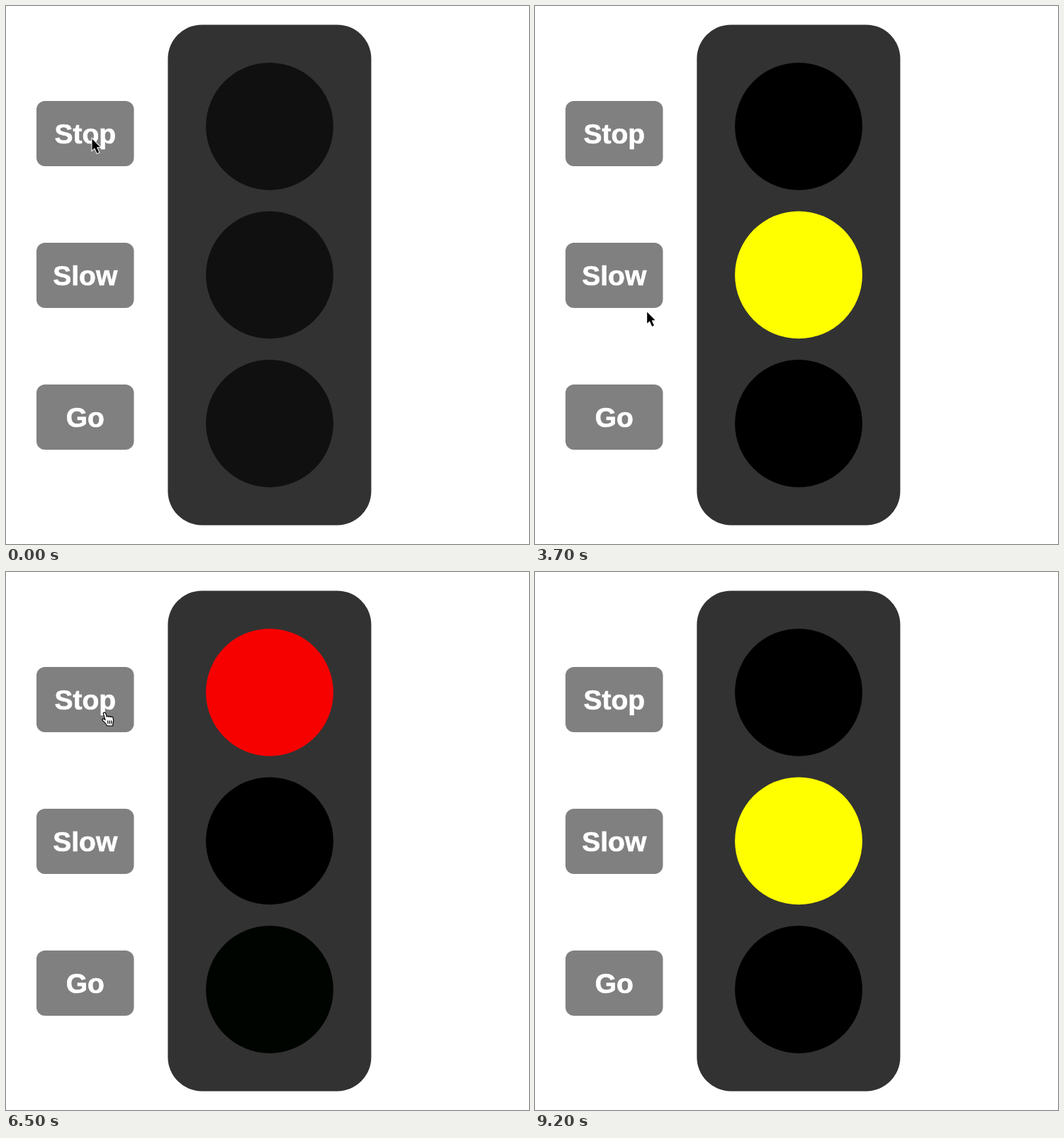
Recreate the animation shown at these times as an HTML page. Size 738 by 759 pixels, loop 9300 ms.

```html
<!DOCTYPE html>
<html lang="en">
<head>
<meta charset="utf-8">
<title>Traffic light</title>
<style>
  html, body { margin: 0; width: 100%; height: 100%; overflow: hidden; background: #fff; }
  svg { display: block; }
  text {
    font: bold 39px "Liberation Sans", Arial, sans-serif;
    fill: #fff; stroke: #fff; stroke-width: .7; text-anchor: middle;
  }
</style>
</head>
<body>
<svg width="738" height="759" viewBox="0 0 738 759">
  <rect x="228.4" y="26.4" width="287" height="706" rx="48" fill="#323232"/>
  <g id="lights"></g>
  <g id="buttons"></g>
  <g id="ring" fill="none">
    <circle r="36.2" stroke="#fff" stroke-width="3.4"/>
    <circle r="36.2" stroke="#000" stroke-width="1.5"/>
  </g>
  <path id="arrow" d="M0 0V16L3.6 12.8L7 20.2L9.8 19L6.5 11.8L11.3 11.4Z"
    stroke="#fff" stroke-width="2" paint-order="stroke"/>
  <g id="hand" stroke="#000" stroke-width="1.2" stroke-linejoin="round">
    <path fill="#fff" d="M2.2 2.2Q4 0 5.6 2.4L7.4 7.2Q9 5.4 10.2 7.4Q12 5.8 13 7.6Q15.4 6.6 16 8.6
      Q17.4 13 16 16L15.8 20H7.6Q6.4 17 1.2 12.4Q.4 9.6 3.2 10.4L5 11.8Z"/>
    <path d="M8.6 12.5L9 17M11.2 12.5L11.4 17M13.8 12.5V17"/>
  </g>
</svg>
<script>
const LOOP = 9300, STEP = 100, FADE = 500, PRESS = 120;
const BUTTON = { x: 43, y: 134, w: 137.5, h: 92, gap: 200 };
const LABELS = ["Stop", "Slow", "Go"];
const LIT = [[255, 0, 0], [255, 255, 0], [0, 128, 0]];
const UNLIT = [16, 16, 16], BLACK = [0, 0, 0];

// Where the cursor goes; a stop with a lamp is a click released at that time
const STOPS = [
  { time: -300, x: 121, y: 187 },
  { time: 650, x: 91, y: 188, lamp: 0 },
  { time: 2515, x: 161, y: 361, lamp: 1 },
  { time: 4500, x: 152, y: 552, lamp: 2 },
  { time: 6110, x: 141, y: 197, lamp: 0 },
  { time: 7665, x: 127, y: 620, lamp: 2 },
  { time: 8500, x: 135, y: 395, lamp: 1 },
  { time: 9440, x: 118, y: 775 }
];
const CLICKS = STOPS.filter(s => s.lamp >= 0);

const $ = id => document.getElementById(id);
const clamp = k => Math.max(0, Math.min(1, k));
const mix = (a, b, k) => a + (b - a) * k;
const smooth = k => k * k * (3 - 2 * k);
const bezier = (p, q, u) => 3 * p * u * (1 - u) ** 2 + 3 * q * u * u * (1 - u) + u ** 3;

// The CSS "ease" curve
function ease(k) {
  let lo = 0, hi = 1;
  for (let i = 0; i < 24; i++) {
    const mid = (lo + hi) / 2;
    if (bezier(.25, .25, mid) < k) lo = mid; else hi = mid;
  }
  return bezier(.1, 1, lo);
}

LABELS.forEach((label, i) => {
  const { x, w, h } = BUTTON, y = BUTTON.y + i * BUTTON.gap;
  $("lights").innerHTML += `<circle cx="372" cy="${169.8 + i * 209.6}" r="89.9"/>`;
  $("buttons").innerHTML += `<rect x="${x}" y="${y}" width="${w}" height="${h}" rx="12" fill="#808080"/>
    <text x="${x + w / 2}" y="${y + 60}">${label}</text>`;
});
const lamps = [...$("lights").children];

// Rest after each stop, then glide to arrive shortly before the next
function cursorAt(t) {
  const i = STOPS.findIndex(s => s.time > t);
  const a = STOPS[i - 1], b = STOPS[i];
  const leave = mix(a.time, b.time, .4), arrive = b.time - 2 * PRESS;
  const k = smooth(clamp((t - leave) / (arrive - leave)));
  return [mix(a.x, b.x, k), mix(a.y, b.y, k)];
}

function lampColor(lamp, click) {
  if (!click) return UNLIT;
  return click.lamp === lamp ? LIT[lamp] : BLACK;
}

function isOverButton(x, y) {
  const dx = x - BUTTON.x, dy = y - BUTTON.y;
  return dx > 0 && dx < BUTTON.w && dy < BUTTON.gap * LABELS.length && dy % BUTTON.gap < BUTTON.h;
}

function place(id, shown, x, y) {
  $(id).setAttribute("visibility", shown ? "visible" : "hidden");
  $(id).setAttribute("transform", `translate(${x} ${y})`);
}

function draw(t) {
  const n = CLICKS.filter(c => c.time <= t).length - 1;
  const k = n < 0 ? 1 : ease(clamp((t - CLICKS[n].time) / FADE));
  lamps.forEach((el, i) => {
    const from = lampColor(i, CLICKS[n - 1]), to = lampColor(i, CLICKS[n]);
    el.setAttribute("fill", `rgb(${from.map((c, j) => Math.round(mix(c, to[j], k)))})`);
  });

  const [x, y] = cursorAt(t);
  const over = t > 0 && isOverButton(x, y);
  const pressed = CLICKS.slice(1).some(c => t <= c.time && t > c.time - PRESS);
  place("hand", over, x - 6, y);
  place("arrow", !over, x + .5, y + .5);
  place("ring", pressed, x, y + .4);
}

const start = performance.now();
function tick() {
  const t = (performance.now() - start) % LOOP;
  draw(Math.floor(t / STEP) * STEP);
  requestAnimationFrame(tick);
}
tick();
</script>
</body>
</html>
```
